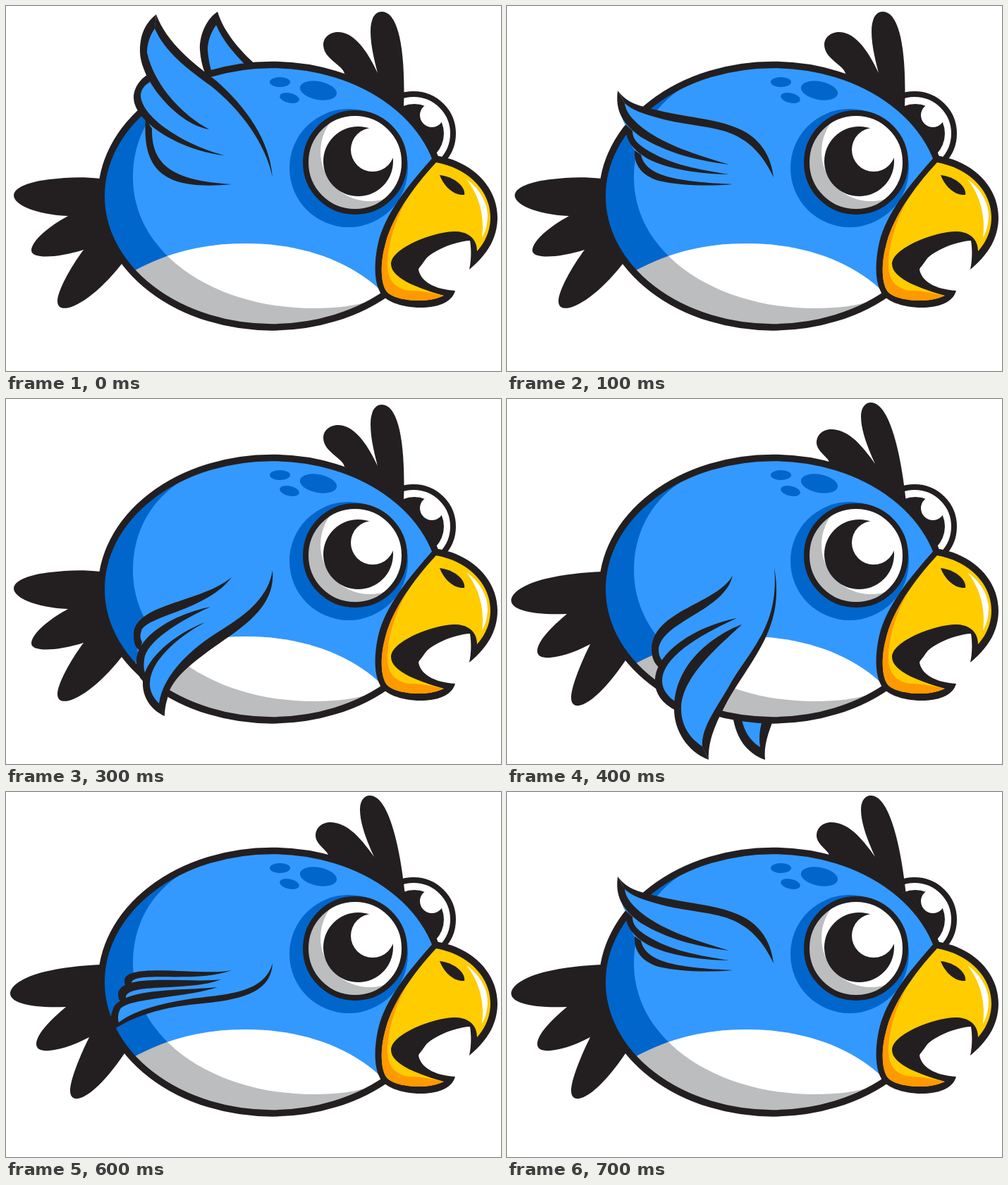
An HTML page that plays this animation: 702x518 px, repeating every 0.8 s.

```html
<!DOCTYPE html>
<html lang="en">
<head>
<meta charset="utf-8">
<title>Flapping bird</title>
<style>
  html, body { margin: 0; width: 100%; height: 100%; overflow: hidden; background: #fff; }
  svg { display: block; width: 702px; height: 518px; }
  .ink { fill: #231f20; }
  .sky { fill: #3399ff; }
  .deep { fill: #0066cc; }
  .white { fill: #fff; }
  .grey { fill: #bbbdbf; }
  .line { fill: none; stroke: #231f20; }
</style>
</head>
<body>
<svg viewBox="0 0 702 518">
  <defs>
    <ellipse id="bodyShape" cx="377.2" cy="269.7" rx="242" ry="186.2"/>
    <path id="belly" d="M183,375 C230,350 280,337 340,337 C420,337 490,362 536,408 L536,480 L170,480 L170,382 Z"/>
    <path id="beakFill" d="M610,222 C655,230 687,262 687,300 C687,318 680,335 668,348 C668,330 655,319 634,320 C600,322 546,345 546,366 C546,388 590,402 621,411 C607,417 597,418 587,418 C562,418 544,412 539,404 C530,390 532,360 537,342 C545,305 573,262 610,222 Z"/>
    <clipPath id="inBody"><use href="#bodyShape"/></clipPath>
    <clipPath id="inLight"><path d="M243,120 C200,150 180,195 180,243 C180,352 296,429 436,429 C470,429 495,425 512,420 L640,380 L640,60 L300,60 Z"/></clipPath>
    <clipPath id="inEye"><circle cx="495" cy="222" r="70"/></clipPath>
    <clipPath id="inBeak"><use href="#beakFill"/></clipPath>
  </defs>

  <g id="back">
    <circle class="white" cx="578" cy="181" r="56"/>
    <circle class="ink" cx="579" cy="181" r="42"/>
    <circle class="white" cx="604" cy="155" r="17"/>
    <circle class="line" cx="578" cy="181" r="56" stroke-width="8"/>
  </g>

  <g clip-path="url(#inBody)">
    <rect class="deep" width="702" height="518"/>
    <rect class="sky" width="702" height="518" clip-path="url(#inLight)"/>
    <use href="#belly" class="grey"/>
    <g clip-path="url(#inLight)"><use href="#belly" class="white"/></g>
    <g class="deep">
      <ellipse cx="388.5" cy="108" rx="14.5" ry="7"/>
      <ellipse cx="402" cy="130.5" rx="14" ry="7" transform="rotate(12 402 130.5)"/>
      <ellipse cx="443" cy="120" rx="26.5" ry="13" transform="rotate(11 443 120)"/>
      <circle cx="486" cy="230" r="84"/>
    </g>
  </g>
  <use href="#bodyShape" class="line" stroke-width="9.5"/>

  <g>
    <g clip-path="url(#inEye)">
      <circle class="grey" cx="495" cy="222" r="70"/>
      <circle class="white" cx="516" cy="207" r="70"/>
    </g>
    <circle class="line" cx="495" cy="222" r="70" stroke-width="8"/>
    <circle class="ink" cx="499.5" cy="220.5" r="49.5"/>
    <circle class="white" cx="520" cy="204" r="31"/>
  </g>

  <g>
    <path class="ink" d="M608,212 C660,219 697,256 697,300 C697,331 681,354 657,374 C660,360 660,345 658,333 C636,334 592,350 585,374 C588,390 606,402 637,404 C632,422 610,428 588,428 C560,428 535,418 530,405 C522,390 522,365 527,340 C535,300 565,260 608,212 Z"/>
    <use href="#beakFill" fill="#ffcc00"/>
    <path clip-path="url(#inBeak)" fill="#ff9900" d="M580,255 C550,300 540,345 541,370 C542,392 555,403 575,404 C592,404 605,408 621,411 L600,440 L520,440 L520,300 Z"/>
    <path class="ink" d="M615,240 C635,242 652,256 650,268 C636,269 622,258 615,240 Z"/>
    <path class="white" d="M653,246 C676,262 684,285 683,300 C682,314 679,322 675,329 C679,300 672,270 653,246 Z"/>
  </g>

  <g id="front"></g>
</svg>

<script>
const STEP = 100;
const STEPS = 8;

// Each pose lists the steps it is shown in, and its [class, path] layers.
const backPoses = [
  { on: [0, 1, 2, 3], layers: [
    ["ink", "M134,245 C110,242 85,243 62,246 C35,249 11,257 11,269 C11,281 40,296 88,298 C62,312 36,333 36,347 C36,359 72,358 110,346 C92,370 73,404 73,419 C73,442 118,425 164,366 L200,300 Z"],
    ["ink", "M480,96 C478,84 450,75 450,55 C450,44 460,37 471,37 C495,37 514,67 527,95 C522,76 517,55 517,36 C517,18 523,8 533,8 C556,8 567,60 564,145 Z"]
  ] },
  { on: [4, 5, 6, 7], layers: [
    ["ink", "M134,245 C108,246 80,249 55,255 C30,261 6,273 6,286 C6,299 35,307 85,305 C65,322 43,343 43,358 C43,374 80,368 118,348 C106,372 91,408 91,424 C91,446 122,439 168,371 L200,300 Z"],
    ["ink", "M456,90 C460,86 439,75 439,62 C439,50 449,43 460,43 C485,43 505,68 522,92 C512,70 502,45 502,25 C502,12 508,5 516,5 C541,5 558,70 566,145 Z"]
  ] },
  { on: [0], layers: [
    ["ink", "M300,8 C282,20 274,45 275,62 C276,78 280,90 284,100 L355,84 C330,62 308,35 300,8 Z"],
    ["sky", "M298,27 C289,40 286,52 286,62 C287,75 289,85 292,95 L340,84 C322,66 307,48 298,27 Z"]
  ] },
  { on: [4], layers: [
    ["ink", "M319,440 C322,480 340,503 366,512 C364,492 370,475 379,452 Z"],
    ["sky", "M331,445 C335,472 345,485 359,494 C357,480 358,468 364,450 Z"]
  ] }
];

// Near wing: fill, leading edge, then three feathers.
const wingPoses = [
  { on: [0], layers: [
    ["sky", "M212,22 C228,58 264,86 295,110 C337,147 372,192 378,243 L320,253 C235,253 202,225 202,165 C190,155 186,140 186,128 C188,112 195,105 200,102 C194,85 195,70 195,64 C195,48 202,30 212,22 Z"],
    ["ink", "M213,12 C228,52 264,80 298,106 C340,143 374,190 378,243 C368,195 333,147 290,113 C258,90 225,65 211,32 Z"],
    ["ink", "M213,12 C194,27 190,46 190,64 C190,105 243,168 288,175 C254,157 211,116 200,66 C200,54 204,42 211,32 Z"],
    ["ink", "M202,97 C190,103 181,117 181,130 C182,168 255,207 310,212 C258,199 194,161 191,128 C191,120 195,113 204,108 Z"],
    ["ink", "M198,160 C193,235 225,262 320,253 C235,248 206,225 207,174 Z"]
  ] },
  { on: [1, 7], layers: [
    ["sky", "M162,130 C172,145 195,150 222,157 C290,168 366,180 378,243 L320,253 C250,253 190,250 185,210 C177,202 172,190 172,175 C160,160 160,145 162,130 Z"],
    ["ink", "M157,120 C172,140 190,142 222,150 C270,160 310,162 340,180 C364,195 375,218 378,243 C364,214 346,190 310,178 C280,169 245,168 215,159 C193,153 178,148 167,138 Z"],
    ["ink", "M157,120 C153,150 165,168 190,186 C225,207 265,219 315,225 C265,210 225,197 195,175 C178,162 168,150 167,138 Z"],
    ["ink", "M168,168 C167,190 178,204 200,217 C230,232 270,238 315,239 C270,232 235,225 205,208 C186,197 178,190 178,177 Z"],
    ["ink", "M181,205 C180,225 190,240 215,248 C245,255 285,256 320,253 C285,251 245,249 218,239 C200,232 192,222 190,211 Z"]
  ] },
  { on: [2, 6], layers: [
    ["sky", "M378,243 C372,288 318,292 268,297 C222,302 182,314 154,334 C152,320 154,312 160,303 C160,294 163,284 172,277 C170,248 275,270 320,253 Z"],
    ["ink", "M378,243 C376,290 320,296 270,301 C220,306 180,318 148,340 L160,327 C185,308 225,299 265,293 C315,287 366,285 378,243 Z"],
    ["ink", "M300,277 C250,282 170,278 153,305 C148,316 147,328 148,340 L160,328 C158,320 159,314 162,308 C175,292 250,293 300,277 Z"],
    ["ink", "M305,266 C260,272 160,255 159,287 C159,294 162,300 167,302 L170,292 C170,270 260,284 305,266 Z"],
    ["ink", "M320,253 C280,262 168,240 168,268 C168,275 172,279 176,281 L178,271 C180,253 270,272 320,253 Z"]
  ] },
  { on: [3, 5], layers: [
    ["sky", "M378,243 C376,285 350,308 312,332 C270,360 228,393 224,442 C205,432 198,420 199,400 C190,390 188,378 188,365 C185,350 185,340 186,330 C192,300 285,300 320,253 Z"],
    ["ink", "M378,243 C382,285 352,312 318,336 C275,366 232,395 229,425 C226,434 225,442 225,450 L217,432 C223,390 265,352 305,328 C345,303 372,280 378,243 Z"],
    ["ink", "M282,317 C240,333 194,370 194,404 C194,425 207,442 225,450 L218,433 C208,424 203,412 204,402 C206,372 240,340 282,317 Z"],
    ["ink", "M290,295 C240,305 186,335 185,372 C184,388 190,400 200,404 L199,393 C195,385 195,378 196,370 C198,345 245,315 290,295 Z"],
    ["ink", "M320,253 C275,290 181,290 181,335 C181,345 183,353 190,357 L193,345 C190,340 190,335 192,329 C198,308 285,300 320,253 Z"]
  ] },
  { on: [4], layers: [
    ["sky", "M379,240 C388,330 344,368 308,428 C290,460 281,480 281,502 C257,490 242,470 242,440 C225,432 215,415 215,400 L216,378 C210,370 210,362 210,355 C214,308 305,300 320,250 Z"],
    ["ink", "M379,239 C394,322 352,362 313,428 C295,462 285,485 286,512 L277,493 C275,465 300,435 318,402 C350,350 386,318 379,239 Z"],
    ["ink", "M333,320 C298,333 237,372 237,440 C237,470 255,500 286,512 L277,493 C257,480 247,461 247,440 C247,393 304,348 333,320 Z"],
    ["ink", "M326,311 C270,322 209,358 210,402 C210,418 220,432 239,442 L241,431 C228,423 220,412 220,400 C220,368 268,337 326,311 Z"],
    ["ink", "M320,250 C300,290 206,300 205,355 C205,368 210,377 217,382 L220,371 C216,366 215,361 215,355 C220,315 310,300 320,250 Z"]
  ] }
];

function svgEl(tag, attrs) {
  const el = document.createElementNS("http://www.w3.org/2000/svg", tag);
  for (const key in attrs) el.setAttribute(key, attrs[key]);
  return el;
}

function addPose(parent, pose) {
  const g = svgEl("g", {});
  for (const [cls, d] of pose.layers) g.append(svgEl("path", { class: cls, d }));
  parent.append(g);

  const frames = [];
  for (let i = 0; i <= STEPS; i++) {
    frames.push({
      offset: i / STEPS,
      opacity: pose.on.includes(i % STEPS) ? 1 : 0,
      easing: "steps(1, end)"
    });
  }
  g.animate(frames, { duration: STEP * STEPS, iterations: Infinity });
}

const back = document.getElementById("back");
const front = document.getElementById("front");
backPoses.forEach(pose => addPose(back, pose));
wingPoses.forEach(pose => addPose(front, pose));
</script>
</body>
</html>
```
